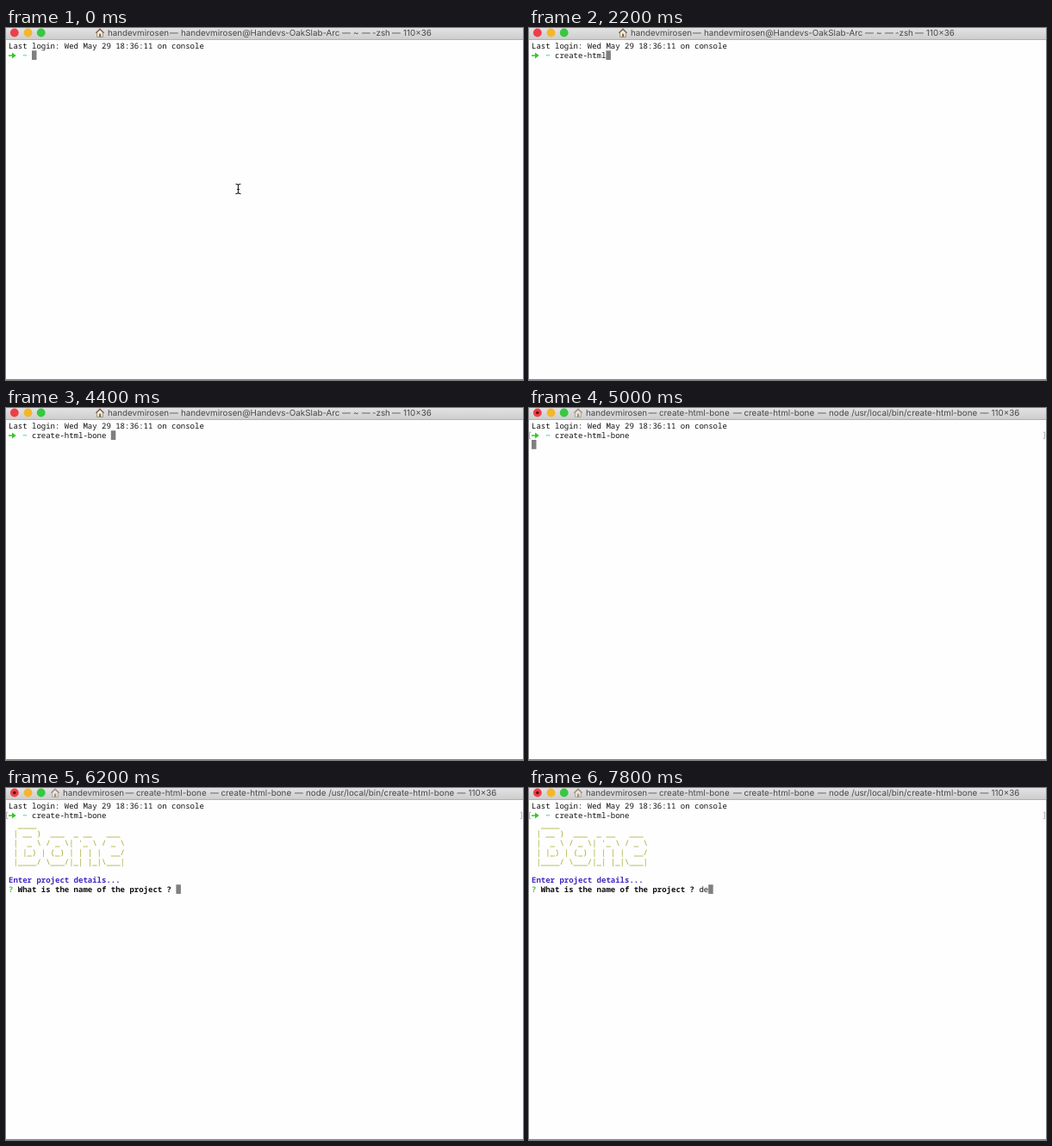
Animation, 600 px wide and 409 px high, one loop 8 s. Source, as an HTML page:

```html
<!DOCTYPE html>
<html lang="en">
<head>
<meta charset="utf-8">
<title>Terminal</title>
<style>
  html, body { margin: 0; width: 100%; height: 100%; overflow: hidden; background: #fff; }
  svg { display: block; width: 600px; height: 409px; }
  text { white-space: pre; text-rendering: geometricPrecision; }
  .mono { font: 500 9px "Noto Sans Mono", "DejaVu Sans Mono", monospace; fill: #111; }
  .mono .bold, .mono.bold { font-weight: 700; }
  .title { font: 9.8px Inter, Roboto, sans-serif; fill: #484848; }
</style>
</head>
<body>
<svg id="stage" viewBox="0 0 600 409">
  <defs>
    <linearGradient id="bar" x2="0" y2="1">
      <stop offset="0" stop-color="#e3e3e3"/>
      <stop offset="1" stop-color="#cdcdcd"/>
    </linearGradient>
  </defs>
  <rect width="600" height="409" fill="#fefefe"/>
  <rect width="600" height="13" fill="url(#bar)"/>
  <rect y="13" width="600" height="1" fill="#b1b1b1"/>
  <rect y="408" width="600" height="1" fill="#858085"/>

  <circle cx="9.8" cy="5.5" r="4.9" fill="#ef3e48"/>
  <circle cx="25.5" cy="5.5" r="4.9" fill="#f5b62a"/>
  <circle cx="40.7" cy="5.5" r="4.9" fill="#36c93f"/>
  <circle id="busyDot" cx="9.8" cy="5.5" r="1.8" fill="#5e0d10"/>

  <g id="house">
    <path d="M1.6 5V10.4H8.4V5L5 1.8Z" fill="#f4ead8" stroke="#7d7263" stroke-width=".7"/>
    <path d="M.3 5.7L5 1.2L9.7 5.7" fill="none" stroke="#806452" stroke-width="1.2"/>
    <path d="M4 10.4V6.7H6.2V10.4Z" fill="#8a6a48"/>
  </g>
  <g id="titles" class="title"></g>

  <g id="lines" class="mono"></g>
  <path d="M3 31.2H7V28.6L11.7 32L7 35.4V32.8H3Z" fill="#35c825"/>
  <g id="marks" fill="none" stroke="#aaa" stroke-width=".9">
    <path d="M2.4 28.2H.6V35.6H2.4"/>
    <path d="M596.8 28.2H598.6V35.6H596.8"/>
  </g>
  <rect id="cursor" width="5.5" height="10.8" fill="#7f7f7f"/>
  <path id="pointer" d="M266.5 181.2Q269.5 181.2 269.5 183V191Q269.5 192.6 266.5 192.6M272.5 181.2Q269.5 181.2 269.5 183M269.5 191Q269.5 192.6 272.5 192.6M268 187.5H271"
        fill="none" stroke="#222" stroke-width="1.1"/>
</svg>
<script>
const LOOP = 8000, STEP = 200;
const LEFT = 3, COLUMN = 5.4, ROW = 10.75;
const SUBMIT = 4600, BANNER = 5400;
const COMMAND = "create-html-bone ", ANSWER = "de";
const COMMAND_COLUMN = 5, ANSWER_COLUMN = 36;

// [time, characters typed]
const commandKeys = [[400, 1], [600, 2], [800, 3], [1000, 4], [1200, 5], [1400, 6],
  [1600, 7], [1800, 9], [2000, 10], [2200, 11], [2400, 12], [2600, 13],
  [2800, 14], [3000, 15], [3200, 17]];
const answerKeys = [[7600, 1], [7800, 2]];

const logo = [
  "  ____",
  " | __ )  ___  _ __   ___",
  " |  _ \\ / _ \\| '_ \\ / _ \\",
  " | |_) | (_) | | | |  __/",
  " |____/ \\___/|_| |_|\\___|"
];

const shellTitle = [[118, "handevmirosen"], [190, "—"], [203, "handevmirosen@Handevs-OakSlab-Arc"],
  [390, "—"], [403, "~"], [413, "—"], [425, "-zsh"], [448, "—"], [461, "110×36"]];
const nodeTitle = [[66, "handevmirosen"], [138.5, "—"], [151, "create-html-bone"],
  [237, "—"], [249.5, "create-html-bone"], [335, "—"],
  [348, "node /usr/local/bin/create-html-bone"], [523.5, "—"], [536.5, "110×36"]];

const $ = id => document.getElementById(id);

function add(parent, tag, attrs = {}, content = "") {
  const node = document.createElementNS("http://www.w3.org/2000/svg", tag);
  for (const key in attrs) node.setAttribute(key, attrs[key]);
  node.textContent = content;
  return parent.appendChild(node);
}

function addTitle(parts) {
  const group = add($("titles"), "g");
  for (const [x, label] of parts) add(group, "text", { x, y: 9.3 }, label);
  return group;
}

function addLine(parent, row, column, content, attrs = {}) {
  return add(parent, "text",
    { x: LEFT + column * COLUMN, y: 24.2 + row * ROW, ...attrs }, content);
}

const show = (node, visible) => node.setAttribute("visibility", visible ? "visible" : "hidden");
const typed = (keys, t) => keys.reduce((count, [at, n]) => t >= at ? n : count, 0);

const idleTitle = addTitle(shellTitle);
const busyTitle = addTitle(nodeTitle);
const lines = $("lines");
addLine(lines, 0, 0, "Last login: Wed May 29 18:36:11 on console");
addLine(lines, 1, 3, "~", { class: "bold", fill: "#35c5b4" });
const command = addLine(lines, 1, COMMAND_COLUMN, "");

const output = add(lines, "g");
logo.forEach((line, i) => addLine(output, 2 + i, 0, line, { fill: "#a2a522" }));
addLine(output, 8, 0, "Enter project details...", { class: "bold", fill: "#4526c4" });
addLine(output, 9, 0, "?", { class: "bold", fill: "#45c93a" });
addLine(output, 9, 2, "What is the name of the project ?", { class: "bold" });
const answer = addLine(output, 9, ANSWER_COLUMN, "");

function placeCursor(row, column) {
  $("cursor").setAttribute("x", LEFT + column * COLUMN);
  $("cursor").setAttribute("y", 15.5 + row * ROW);
}

function draw(now) {
  const t = Math.floor((now % LOOP) / STEP) * STEP;
  const busy = t >= SUBMIT, asking = t >= BANNER;
  const commandLength = typed(commandKeys, t);
  const answerLength = typed(answerKeys, t);

  show(idleTitle, !busy);
  for (const node of [busyTitle, $("busyDot"), $("marks")]) show(node, busy);
  show(output, asking);
  show($("pointer"), t < commandKeys[0][0]);
  $("house").setAttribute("transform", `translate(${busy ? 52 : 104} 0)`);
  $("house").setAttribute("opacity", busy ? 0.65 : 1);

  command.textContent = COMMAND.slice(0, commandLength);
  answer.textContent = ANSWER.slice(0, answerLength);
  if (asking) placeCursor(9, ANSWER_COLUMN + answerLength);
  else if (busy) placeCursor(2, 0);
  else placeCursor(1, COMMAND_COLUMN + commandLength);
}

const start = performance.now();
function tick() {
  draw(performance.now() - start);
  requestAnimationFrame(tick);
}
tick();
</script>
</body>
</html>
```
